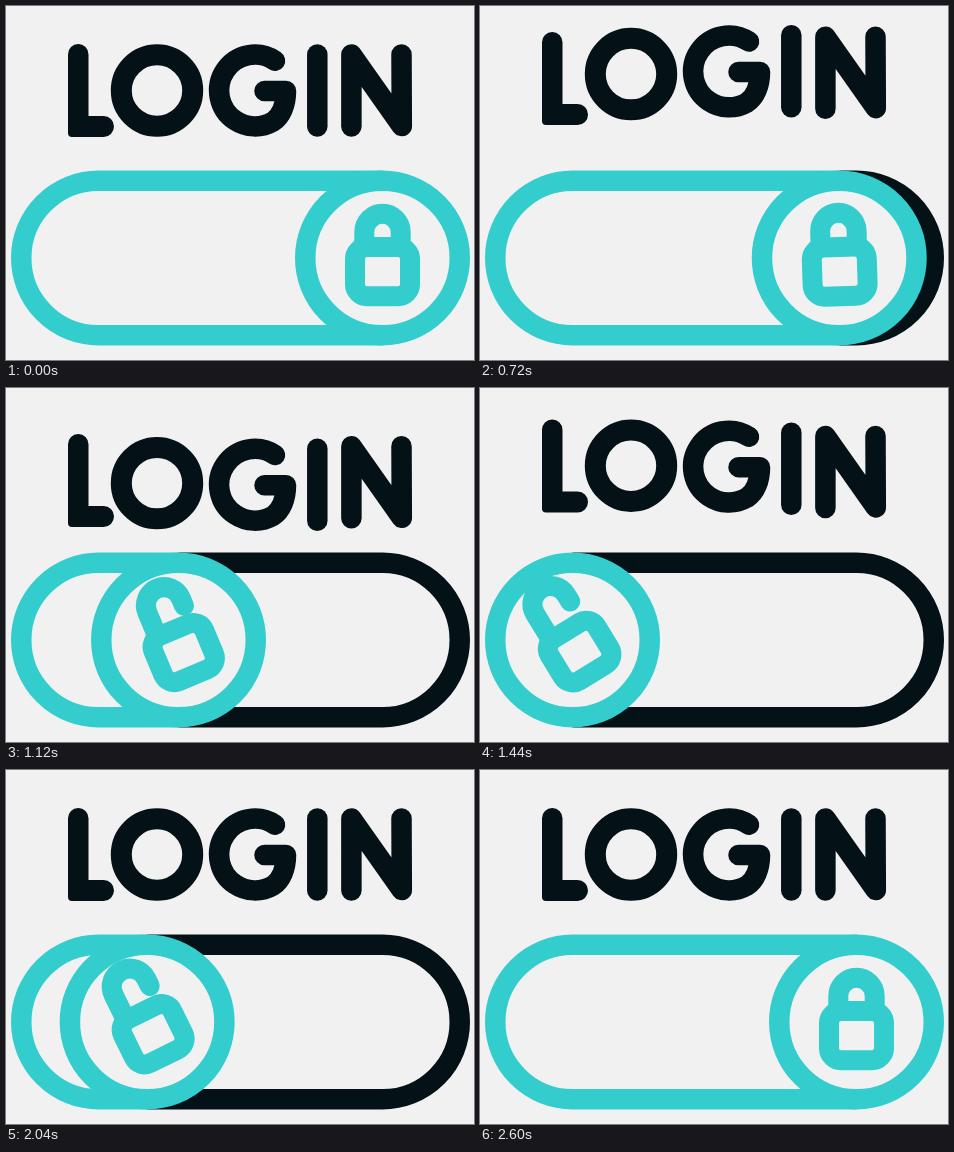
An HTML page with a canvas for the animation above (2.82 s loop, 468 px wide and 354 px high).

```html
<!DOCTYPE html>
<html lang="en">
<head>
<meta charset="utf-8">
<title>Login switch</title>
<style>
  html, body { margin: 0; width: 100%; height: 100%; overflow: hidden; background: #f1f1f1; }
  canvas { display: block; width: 468px; height: 354px; }
</style>
</head>
<body>
<canvas id="stage" width="468" height="354" role="img" aria-label="LOGIN"></canvas>
<script>
const ctx = document.getElementById('stage').getContext('2d');
const W = 468, H = 354, LOOP = 2820, STEP = 20;
const BG = '#f1f1f1', TEAL = '#34cdce', DARK = '#041117';
const LEFT = 92.5, RIGHT = 376.5, MID_Y = 252, RADIUS = 77.25;

const ease = (t, start, length) => {
  const x = Math.min(1, Math.max(0, (t - start) / length));
  return x * x * (3 - 2 * x);
};

function stroke(color, width, trace) {
  ctx.strokeStyle = color;
  ctx.lineWidth = width;
  ctx.beginPath();
  trace();
  ctx.stroke();
}

function polyline(...points) {
  points.forEach(([x, y], i) => i ? ctx.lineTo(x, y) : ctx.moveTo(x, y));
}

const letters = [
  () => {
    ctx.fillStyle = DARK;
    ctx.beginPath();
    ctx.roundRect(62, 38, 20.5, 93, [10.2, 10.2, 0, 4]);
    ctx.roundRect(62, 110, 46, 21, [0, 10.4, 10.4, 4]);
    ctx.fill();
  },
  () => stroke(DARK, 21, () => ctx.arc(151, 84.5, 35.7, 0, 2 * Math.PI)),
  () => stroke(DARK, 20.5, () => {
    ctx.arc(249, 84.5, 35.9, -0.98, Math.PI / 3, true);
    ctx.bezierCurveTo(275, 110.5, 280, 99, 280, 85);
    ctx.lineTo(258.5, 85);
  }),
  () => stroke(DARK, 20.5, () => polyline([311.3, 48.5], [311.3, 120.5])),
  () => stroke(DARK, 20.5, () =>
    polyline([345.4, 120.5], [345.4, 48.5], [395.8, 120], [395.5, 48.5]))
];

// Successive swing extremes, each reached after one SWING.
const SWING = 400, FIRST_START = 194, STAGGER = 49.5;
const extremes = [0, -19.5, 12.5, -6.8, 0];

function bounce(t, index) {
  const start = FIRST_START + index * STAGGER;
  let y = 0;
  for (let k = 1; k < extremes.length; k++) {
    y += (extremes[k] - extremes[k - 1]) * ease(t, start + (k - 1) * SWING, SWING);
  }
  return y;
}

function drawWord(t) {
  letters.forEach((letter, i) => {
    ctx.save();
    ctx.translate(0, bounce(t, i));
    letter();
    ctx.restore();
  });
}

function drawTrackPart(color, from, to) {
  if (to - from < 0.1) return;
  ctx.save();
  ctx.beginPath();
  ctx.rect(from, 0, to - from, H);
  ctx.clip();
  stroke(color, 20.5, () => ctx.roundRect(
    LEFT - RADIUS, MID_Y - RADIUS, RIGHT - LEFT + 2 * RADIUS, 2 * RADIUS, RADIUS));
  ctx.restore();
}

function drawLock(x, open) {
  ctx.save();
  ctx.translate(x, MID_Y);
  ctx.rotate(-31.5 * open * Math.PI / 180);
  stroke(TEAL, 20, () => ctx.roundRect(-27.5, -11, 55, 49.2, 12));
  const top = -26 - 16 * open;
  stroke(TEAL, 20, () => {
    ctx.moveTo(-18.2, -11);
    ctx.lineTo(-18.2, top);
    ctx.arc(0, top, 18.2, Math.PI, 0);
    ctx.lineTo(18.2, top + 8);
  });
  ctx.restore();
}

function drawSwitch(t) {
  const open = ease(t, 600, 800) - ease(t, 1840, 760);
  const x = RIGHT + (LEFT - RIGHT) * open;
  if (x < RIGHT - 0.1) drawTrackPart(DARK, x, W);
  if (x > LEFT + 0.1) drawTrackPart(TEAL, 0, x + 0.5);
  stroke(TEAL, 20.5, () => ctx.arc(x, MID_Y, RADIUS, 0, 2 * Math.PI));
  drawLock(x, open);
}

function frame(now) {
  const t = Math.floor((now % LOOP) / STEP) * STEP;
  ctx.fillStyle = BG;
  ctx.fillRect(0, 0, W, H);
  ctx.lineCap = ctx.lineJoin = 'round';
  drawWord(t);
  drawSwitch(t);
}

let origin = null;
function tick(now) {
  origin ??= now;
  frame(Math.max(0, now - origin));
  requestAnimationFrame(tick);
}
frame(0);
requestAnimationFrame(tick);
</script>
</body>
</html>
```
